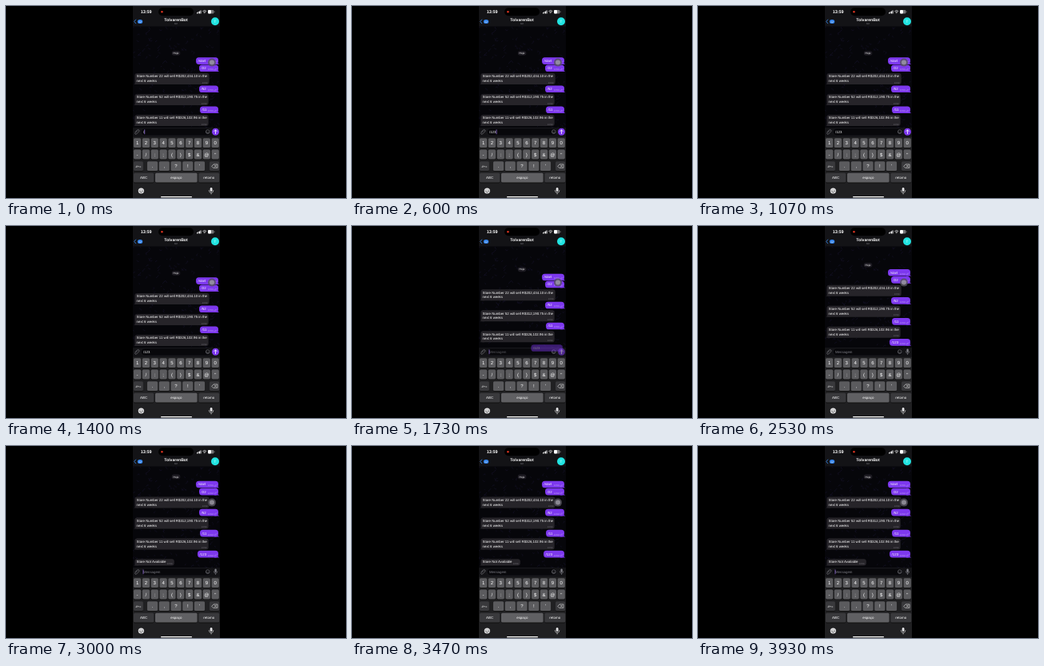
These frames come from a looping animation (426x240 px, 3990 ms). An HTML page:

```html
<!DOCTYPE html>
<html lang="pt">
<head>
<meta charset="utf-8">
<title>Chat</title>
<style>
html, body { margin: 0; width: 100%; height: 100%; overflow: hidden; background: #000 }
svg { display: block; width: 100vw; height: 100vh }
text { font-family: "Liberation Sans", Arial, sans-serif; text-rendering: geometricPrecision; white-space: pre }
</style>
</head>
<body>
<script>
const LOOP = 3990, SEND = 1600, REPLY = 2650, SLIDE = 280, STEP = 10.3;
const PURPLE = '#7d38ee', GREY = '#262429', DIM = '#85858c';

const rect = (x, y, w, h, fill, r = 0, extra = '') =>
  `<rect x="${x}" y="${y}" width="${w}" height="${h}" rx="${r}" fill="${fill}" ${extra}/>`;
const circle = (x, y, r, fill, extra = '') =>
  `<circle cx="${x}" cy="${y}" r="${r}" fill="${fill}" ${extra}/>`;
const line = (d, stroke = DIM, w = .6) =>
  `<path d="${d}" fill="none" stroke="${stroke}" stroke-width="${w}" stroke-linecap="round" stroke-linejoin="round"/>`;
// y is the vertical centre of the text
const text = (x, y, s, size, fill = '#fff', anchor = 'start', extra = '') =>
  `<text x="${x}" y="${y + size * .35}" font-size="${size}" fill="${fill}" text-anchor="${anchor}" ${extra}>${s}</text>`;

function sent(x, y, s) {
  return rect(x, y, 266 - x, 8.6, PURPLE, 3.6) +
    `<path d="M263 ${y + 5}L267 ${y + 8.6}H261Z" fill="${PURPLE}"/>` +
    text(x + 2.6, y + 4.2, s, 4.35) +
    text(259.6, y + 5.8, '13:59', 2.7, '#c9b0f5', 'end') +
    line(`M260.5 ${y + 5.9}l.8 .8 1.5-1.8m-.4 1.8l1.5-1.8`, '#c9b0f5', .35);
}

function received(y, w, rows) {
  const h = rows.length * 5.8 + 2.4;
  return rect(161.3, y, w, h, GREY, 3.2) +
    `<path d="M164 ${y + h - 4}L160.4 ${y + h}H166Z" fill="${GREY}"/>` +
    rows.map((s, i) => text(163.6, y + 3.7 + i * 5.9, s, 4.35)).join('') +
    text(159 + w, y + h - 2.2, '13:59', 2.7, '#77757c', 'end');
}

const forecast = (y, w, store, value) =>
  received(y, w, [`Store Number ${store} will sell R$${value} in the`, 'next 6 weeks']);

// faint doodled wallpaper
function wallpaper() {
  let seed = 7, d = '';
  const rnd = n => (seed = seed * 16807 % 2147483647) / 2147483647 * n;
  for (let i = 0; i < 190; i++) {
    const a = rnd(6) - 3, b = rnd(6) - 3;
    d += `M${160 + rnd(106)} ${26 + rnd(126)}q${a} ${b} ${b} ${a}`;
  }
  return line(d, '#17142b', .6);
}

function key(x, y, w, label, fill = '#5b5b5e', size = 6) {
  return rect(x, y + .6, w, 12, '#111', 1.6) + rect(x, y, w, 11.8, fill, 1.6) +
    text(x + w / 2, y + 6, label, size, '#fff', 'middle');
}

function keyboard() {
  const dark = '#39393c';
  let s = rect(159, 163.5, 109, 76.5, '#202022');
  ['1234567890', '-/:;()$&@"'].forEach((row, r) => [...row].forEach((c, i) => {
    s += key(159.9 + i * 10.85, 165.2 + r * 14.4, 9.3, c === '&' ? '&amp;' : c);
  }));
  s += key(159.9, 194.2, 12, '#+=', dark, 4);
  [...".,?!'"].forEach((c, i) => s += key(176.9 + i * 14.75, 194.2, 13.2, c));
  s += key(255, 194.2, 12.2, '', dark) +
    line('M258 200.1l2-2.2h5v4.4h-5zM261.4 199l2 2.2m0-2.2l-2 2.2', '#eee', .55);
  s += key(159.9, 208.8, 25.4, 'ABC', dark, 4.4) + key(187, 208.8, 52.6, 'espaço', '#606063', 4.4) +
    key(241.3, 208.8, 26, 'retorno', dark, 4.4);
  s += circle(169.3, 231, 3.6, '#e4e4e6') + circle(168, 230.1, .5, '#222') + circle(170.6, 230.1, .5, '#222') +
    line('M167.2 231.8q2.1 2.6 4.2 0', '#222', .7);
  s += rect(255.7, 227, 2.8, 5, '#e4e4e6', 1.4) + line('M254.3 230.5q0 3 2.8 3t2.8-3m-2.8 3v1.6', '#e4e4e6', .6);
  return s + rect(194, 238, 39, 1.3, '#fff', .65);
}

function header() {
  let s = rect(159, 0, 109, 25.5, '#131316') +
    text(175.7, 7.3, '13:59', 5.4, '#fff', 'middle', 'font-weight="700"') +
    rect(191, 2.3, 44, 10, '#000', 5) + circle(195.4, 7.2, 1.3, '#d8321f');
  for (let i = 0; i < 4; i++) s += rect(239 + i * 1.5, 8 - i * .8, 1, 1.4 + i * .8, '#fff', .2);
  s += line('M246.7 6.3q2.1-1.8 4.2 0M247.7 7.6q1.1-.9 2.2 0', '#fff', .7) + circle(248.8, 8.8, .5, '#fff') +
    rect(253, 5, 7.4, 4.4, '#77777a', 1.2) + rect(253, 5, 4, 4.4, '#fff', 1.2) + rect(260.8, 6.4, .6, 1.6, '#999', .3);
  s += line('M162.6 17l-1.9 2.4 1.9 2.4', '#3b8df0', .8) + rect(164.8, 17, 6.4, 5, '#2f7fe6', 2.5) +
    text(168, 19.5, '22', 3.2, '#fff', 'middle');
  s += text(213, 17.3, 'TolvarenBot', 5.1, '#fff', 'middle', 'font-weight="700"') +
    text(213, 22.3, 'bot', 3, '#77777d', 'middle');
  return s + circle(262, 19.3, 5, '#22e4e2') + text(262, 19.3, 'T', 4.6, '#e8ffff', 'middle');
}

document.body.innerHTML = `<svg viewBox="0 0 426 240">
<clipPath id="view"><rect x="159" y="25" width="109" height="127.5"/></clipPath>
<clipPath id="phone"><rect x="159" y="0" width="109" height="240"/></clipPath>
<rect width="426" height="240"/>
<g clip-path="url(#phone)">
${rect(159, 0, 109, 240, '#06060a')}${wallpaper()}
<g clip-path="url(#view)"><g id="chat">
  ${rect(207.7, 56.2, 10.6, 5.6, '#1d1b22', 2.8)}${text(213, 59, 'Hoje', 3.3, '#fff', 'middle')}
  ${sent(238, 64.3, '/start')}${sent(242, 73.4, '/22')}
  ${forecast(84, 93.4, 22, '202,434.10')}
  ${sent(242, 99.4, '/52')}
  ${forecast(110, 92.4, 52, '312,190.75')}
  ${sent(243, 125.4, '/11')}
  ${forecast(136, 92.4, 11, '326,102.96')}
  <g id="mine">${sent(240, 151.4, '/123')}</g>
  <g id="reply">${received(161.8, 49.5, ['Store Not Available'])}</g>
</g></g>
${circle(258, 70.6, 5, '#55525c', 'opacity=".8"')}${circle(258, 70.6, 3, '#a8a5b0', 'opacity=".7"')}
${header()}
${rect(159, 152, 109, 11.5, '#131316')}
${rect(169, 152.7, 88, 9.3, '#08080b', 4.6, 'stroke="#2b2b30" stroke-width=".4"')}
${line('M162 157.5l2.5-2.6q1.3-1 2.1 .1t-.1 2l-3 3q-1.2 .8-1.7-.1t.3-1.5l2.6-2.6')}
<g id="draft">${text(172, 157.2, '', 4.35)}</g>
<g id="hint">${text(172, 157.2, 'Mensagem', 4.35, '#7c7c84')}</g>
<rect id="caret" y="154.4" width=".7" height="5.8" fill="#a57af5"/>
${circle(252.8, 157.2, 2.4, 'none', `stroke="${DIM}" stroke-width=".6"`)}${line('M251.6 157.8q1.2 1.3 2.4 0')}
<g id="mic">${rect(261.5, 153.5, 2.2, 4.4, DIM, 1.1)}${line('M260.4 156.8q0 2.4 2.2 2.4t2.2-2.4m-2.2 2.4v1.4')}</g>
<g id="send">${circle(262.5, 157.2, 4.5, PURPLE)}${line('M262.5 159.6v-4.6m-1.8 1.7l1.8-1.8 1.8 1.8', '#fff', .8)}</g>
<g id="flying"><rect height="8.6" rx="3.6" fill="${PURPLE}"/>${text(0, 0, '/123', 4.35)}</g>
${keyboard()}
</g></svg>`;

const $ = id => document.getElementById(id);
const set = (el, attrs) => { for (const k in attrs) el.setAttribute(k, attrs[k]); };
const progress = (t, start) => Math.min(1, Math.max(0, (t - start) / SLIDE));
const smooth = p => p * p * (3 - 2 * p);
const mix = (a, b, p) => a + (b - a) * p;
const draft = $('draft').firstChild, [bubble, label] = $('flying').children;

function draw(now) {
  const t = now % LOOP, u = progress(t, SEND), p = smooth(u), q = smooth(progress(t, REPLY));
  const isSent = t >= SEND;
  set($('chat'), { transform: `translate(0 ${-STEP * (p + q)})` });
  set($('mine'), { opacity: u < 1 ? 0 : 1 });
  set($('reply'), { opacity: q });

  const typed = isSent ? '' : '/123'.slice(0, 1 + Math.floor(t / 150));
  draft.textContent = typed;
  const blink = (t - (isSent ? SEND : 450) + LOOP) % 1000 < 550;
  set($('caret'), { x: 172.2 + (typed ? draft.getComputedTextLength() : -.6), opacity: t < 450 || blink ? 1 : 0 });
  set($('hint'), { opacity: Math.sqrt(p) });
  set($('mic'), { opacity: p });
  set($('send'), { opacity: 1 - p });

  const x = mix(169, 240, 1 - (1 - u) ** 2.4), y = mix(154, 141.1, p);
  set($('flying'), { opacity: u < 1 ? p : 0 });
  set(bubble, { x, y, width: mix(262, 266, p) - x });
  set(label, { x: x + 2.6, y: y + 5.7 });
  requestAnimationFrame(() => draw(performance.now()));
}
draw(performance.now());
</script>
</body>
</html>
```
